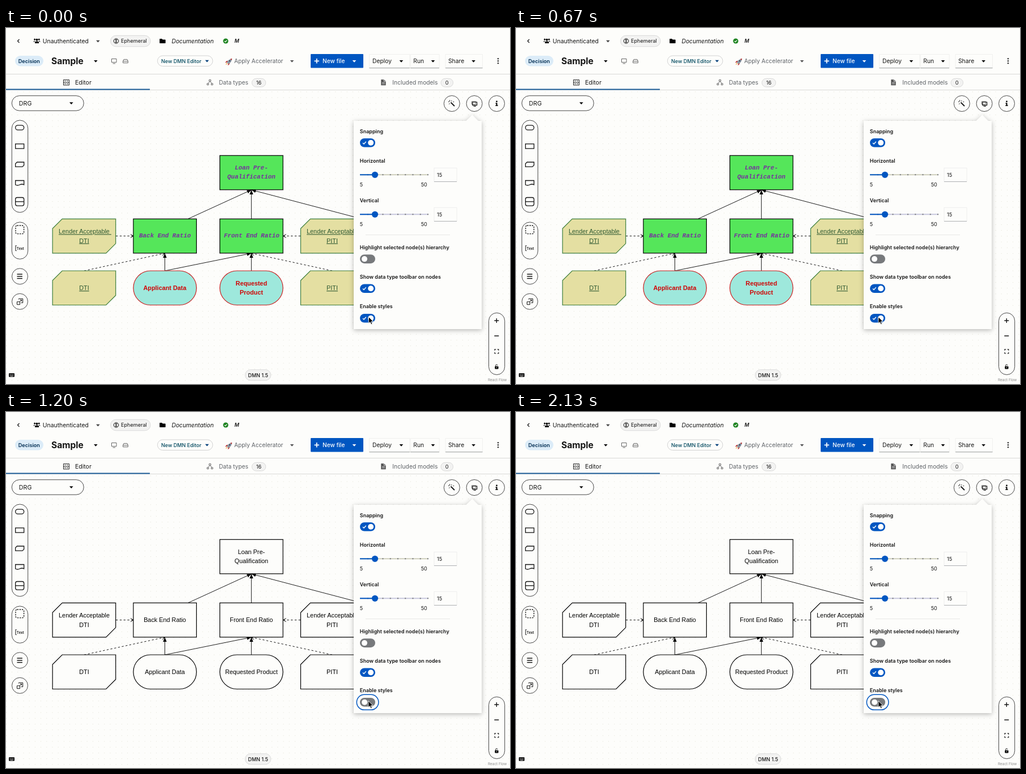
Animation of 890x629 px, one loop 2200 ms. Source, as an HTML page:

```html
<!DOCTYPE html>
<html lang="en">
<head>
<meta charset="utf-8">
<title>Diagram editor: enable styles</title>
<style>
  html, body { margin: 0; width: 100%; height: 100%; overflow: hidden; background: #fdfdfb; }
  svg { display: block; width: 890px; height: 629px; }
  text { font: 10.3px Inter, "Open Sans", sans-serif; fill: #151515; }
  .small text, text.small { font-size: 9.1px; }
  .head text { font-size: 9px; font-weight: 600; }
  .bold { font-weight: 600; }
  .medium { font-weight: 500; }
  .grey { fill: #5f6368; }
  .mid { text-anchor: middle; }
  .ln { fill: none; stroke: #151515; }
  .soft { stroke: #666; }
  .box { fill: #fdfdfb; stroke: #333; stroke-width: .9; }
  .pill { fill: #f3f3f2; stroke: #d2d2d2; stroke-width: .8; }
  .blue { fill: #0056c1; }
  .off-fill { fill: #77797c; }
  .dot { fill: #fff; }

  /* diagram */
  .solid, .dashed { fill: none; stroke: #000; stroke-width: .9; }
  .solid { marker-end: url(#full); }
  .dashed { marker-end: url(#open); stroke-dasharray: 3.4; }
  .nodes { stroke-width: 1.2; }
  .nodes text { font: 10.85px "Liberation Sans", Arial, sans-serif; text-anchor: middle; stroke: none; fill: #000; }
  .plain { fill: #fdfdfb; stroke: #000; }
  .know { fill: #e4dfa2; stroke: #3c7d3a; }
  .know text { fill: #2e5932; text-decoration: underline; }
  .dec { fill: #55e65a; stroke: #000; }
  .dec text { font: italic bold 10.9px "Liberation Mono", "Courier New", monospace; fill: #76309f; }
  .inp { fill: #9ee8dc; stroke: #c81e1e; }
  .inp text { font-weight: bold; fill: #d00505; }

  /* one loop, the click lands at 42.25% */
  .on, .off, .knob, .cursor { animation: 2200ms step-end infinite; }
  .on { animation-name: on; }
  .off { animation-name: off; }
  .knob { animation-name: knob; }
  .cursor { animation-name: cursor; }
  @keyframes on { 0% { opacity: 1 } 42.25%, 100% { opacity: 0 } }
  @keyframes off { 0% { opacity: 0 } 42.25%, 100% { opacity: 1 } }
  @keyframes knob {
    0% { transform: none }
    42.25% { transform: translateX(-3px) }
    45.43% { transform: translateX(-8.5px) }
    48.6%, 100% { transform: translateX(-11px) }
  }
  @keyframes cursor { 0% { transform: none } 27.25%, 100% { transform: translateX(-.6px) } }
</style>
</head>
<body>
<svg viewBox="0 0 890 629">
  <defs>
    <pattern id="dots" x="76.9" y="219.9" width="10.2" height="10.2" patternUnits="userSpaceOnUse">
      <circle cx="5.1" cy="5.1" r=".55" fill="#d6d6c6"/>
    </pattern>
    <marker id="full" viewBox="0 0 8 8" refX="8" refY="4" markerWidth="8" markerHeight="8" markerUnits="userSpaceOnUse" orient="auto">
      <path d="M0 .8L8 4L0 7.2z"/>
    </marker>
    <marker id="open" viewBox="0 0 8 8" refX="7" refY="4" markerWidth="8" markerHeight="8" markerUnits="userSpaceOnUse" orient="auto">
      <path d="M2 1L7 4L2 7" fill="none" stroke="#000"/>
    </marker>
    <path id="caret" d="M-3.3-1.6h6.6L0 2.1z"/>
    <path id="bkm" d="M17 0H111.5V43.5L94.5 60.5H0V17z"/>
    <rect id="rect" width="111.5" height="60.5"/>
    <rect id="oval" width="111.5" height="60.5" rx="30.2"/>
    <rect id="track" width="27" height="15.6" rx="7.8"/>
    <g id="checked">
      <use href="#track" class="blue"/>
      <path d="M5 8l2 2 3.8-4.3" fill="none" stroke="#fff" stroke-width="1.4"/>
    </g>
    <g id="slider">
      <path d="M0 0H120" stroke-width="2"/>
      <path d="M13 0H121" stroke="#77797c" stroke-width="2" stroke-dasharray="2 11.25"/>
      <path d="M0 0H26" stroke="#0056c1" stroke-width="2"/>
      <circle cx="26.5" r="5.6" class="blue" stroke="none"/>
      <rect x="131" y="-12" width="40" height="24" fill="#fdfdfb" stroke="#eee"/>
      <path d="M131 12.2h40" stroke="#b0b2b5"/>
    </g>
  </defs>

  <rect width="890" height="629" fill="#fdfdfb"/>
  <rect y="109" width="890" height="520" fill="url(#dots)"/>

  <!-- top bar -->
  <path class="ln" d="M23.5 20l-3 3 3 3" stroke-width="1.2"/>
  <g>
    <circle cx="54.5" cy="20.8" r="2"/><circle cx="50.7" cy="20.2" r="1.4"/><circle cx="58.3" cy="20.2" r="1.4"/>
    <path d="M51 27v-1.5q0-2 2-2h3q2 0 2 2V27zM48.6 24.6q0-2.2 2-2.2h.7q-1.3 1-1.3 2.2zM60.4 24.6q0-2.2-2-2.2h-.7q1.3 1 1.3 2.2z"/>
  </g>
  <text x="64.8" y="26.8" style="font-size:10.4px">Unauthenticated</text>
  <use href="#caret" x="162.4" y="23.3" fill="#444"/>
  <rect class="pill" x="184.5" y="13.3" width="70.5" height="19.5" rx="9.7"/>
  <circle class="ln" cx="194.5" cy="23" r="4.3"/>
  <path class="ln" d="M192.8 20.5h3.4l-3.4 5h3.4z" stroke-width=".9"/>
  <text class="small" x="203" y="26.4">Ephemeral</text>
  <path d="M271.2 19.8q0-.8.8-.8h3.3l1.4 1.4h4.2q.8 0 .8.8v5q0 .8-.8.8H272q-.8 0-.8-.8z"/>
  <text x="292.5" y="26.8" style="font-style:italic">Documentation</text>
  <circle cx="388" cy="23" r="4.6" fill="#1f8422"/>
  <path d="M385.8 23.1l1.6 1.6 2.8-3.1" fill="none" stroke="#fff" stroke-width="1.2"/>
  <text x="403.5" y="26.3" style="font:italic 600 9px Inter,sans-serif">M</text>

  <rect x="16" y="49" width="50" height="18.5" rx="9.2" fill="#dcecf8"/>
  <text class="small bold" x="21.8" y="61.8" style="fill:#002d52">Decision</text>
  <text x="80" y="64.2" style="font-size:15.6px;font-weight:700">Sample</text>
  <use href="#caret" x="158.4" y="58.6"/>
  <path class="ln soft" d="M186.5 54.5h8.5v6.2h-8.5zM188.5 62.8h4.6"/>
  <path class="ln soft" d="M206.6 58.5l1.4-3h6l1.4 3v3.2h-8.8zM206.6 58.7h8.8"/>
  <rect x="267.5" y="49" width="97.5" height="18.5" rx="9.2" fill="#fdfdfb" stroke="#d2d2d2"/>
  <text class="medium" x="274" y="61.8" style="font-size:9px;fill:#00485e">New DMN Editor</text>
  <use href="#caret" x="355" y="58.4" fill="#003f7a"/>
  <g>
    <path d="M390 61l-3 .4 2.3-3.2 3-.5zM392 63.3l-.2 3 3-2.6.4-3z" fill="#c23a38"/>
    <path d="M390 60.8q2.2-5.3 9.2-6.9-.7 7-6.6 9.6z" fill="#8b97a4"/>
    <path d="M396 54.8q1.6-.7 3.2-.9-.2 1.6-.8 3.2z" fill="#c23a38"/>
    <circle cx="395" cy="58.2" r="1.1" fill="#345"/>
    <path d="M390 61.4l-2.4 3.5 3.8-2z" fill="#f2a43a"/>
  </g>
  <text class="grey" x="403" y="62.3" style="font-size:10.2px">Apply Accelerator</text>
  <use href="#caret" x="505" y="58.6" fill="#555"/>
  <rect class="blue" x="538" y="46" width="93" height="24.5" rx="1"/>
  <path d="M544.5 58.3h8.4M548.7 54.1v8.4" stroke="#fff" stroke-width="1.8"/>
  <text class="medium" x="559" y="62.2" style="fill:#fff;font-size:10.1px">New file</text>
  <use href="#caret" x="615" y="58.6" fill="#fff"/>
  <path d="M641.5 46.5H713v24h-71.5zM714 46.5h51v24h-51zM776 46.5h65.5v24H776z" fill="none" stroke="#f0f0ee"/>
  <path d="M641.5 70.7H713M714 70.7h51M776 70.7h65.5" stroke="#8f9296" stroke-width=".9"/>
  <text x="647" y="62.2">Deploy</text>
  <text x="719.3" y="62.2">Run</text>
  <text x="781" y="62.2">Share</text>
  <use href="#caret" x="698" y="58.6"/><use href="#caret" x="754" y="58.6"/><use href="#caret" x="825.6" y="58.6"/>
  <g fill="#333"><circle cx="869" cy="54.3" r="1.3"/><circle cx="869" cy="58.3" r="1.3"/><circle cx="869" cy="62.3" r="1.3"/></g>

  <!-- tabs -->
  <path d="M0 81.5H890M0 109.5H890" stroke="#d9d9d7"/>
  <rect y="107.5" width="254" height="2" fill="#1f5f99"/>
  <path class="ln" d="M101.5 91.5h10V101h-10zM101.5 96.3h10M103.3 93.8h2.5M107.3 93.8h2.5M103.3 98.7h2.5M107.3 98.7h2.5" stroke-width=".9"/>
  <text x="122" y="99.9" style="font-size:10.5px">Editor</text>
  <path class="ln soft" d="M358.7 91.5h3v2.8h-3zM355 98h2.8v2.6H355zM362.4 98h2.8v2.6h-2.8zM360.2 94.3l-3.6 3.7M360.2 94.3l3.6 3.7"/>
  <text class="grey" x="376" y="99.9" style="font-size:10.2px">Data types</text>
  <rect class="pill" x="434.3" y="89.3" width="24.4" height="14.8" rx="7.4"/>
  <text class="small mid" x="446.5" y="99.8">16</text>
  <path d="M662.3 91h5.2l3.2 3.2v7h-8.4z" fill="#555"/>
  <path d="M667.3 91v3.4h3.4M664 96.5h5M664 98.7h5" fill="none" stroke="#fff" stroke-width=".7"/>
  <text class="grey" x="682.3" y="99.9">Included models</text>
  <rect class="pill" x="768" y="89.3" width="21.5" height="14.8" rx="7.4"/>
  <text class="small mid" x="778.7" y="99.8">0</text>

  <!-- diagram -->
  <path class="solid" d="M322 337L433.3 286"/>
  <path class="solid" d="M433.3 337V286"/>
  <path class="solid" d="M632 338.3L433.3 286"/>
  <path class="solid" d="M280.5 429V398"/>
  <path class="solid" d="M280.5 429L433.3 398"/>
  <path class="solid" d="M433.3 429V398"/>
  <path class="dashed" d="M194 367.5H225"/>
  <path class="dashed" d="M520 367.5H489.5"/>
  <path class="dashed" d="M138 429L280.5 398"/>
  <path class="dashed" d="M576 429L433.3 398"/>

  <g class="nodes off plain">
    <use href="#rect" x="377.6" y="225.3"/><use href="#rect" x="224.9" y="337.3"/><use href="#rect" x="377.6" y="337.3"/>
    <use href="#bkm" x="82.2" y="337.3"/><use href="#bkm" x="82.2" y="429"/>
    <use href="#bkm" x="520.4" y="337.3"/><use href="#bkm" x="520.4" y="429"/>
    <use href="#oval" x="224.9" y="429"/><use href="#oval" x="377.6" y="429"/>
    <text x="433.3" y="251.3">Loan Pre-</text><text x="433.3" y="267.3">Qualification</text>
    <text x="280.5" y="371.3">Back End Ratio</text><text x="433.3" y="371.3">Front End Ratio</text>
    <text x="138" y="363.3">Lender Acceptable</text><text x="138" y="379.5">DTI</text><text x="138" y="463.2">DTI</text>
    <text x="576" y="363.3">Lender Acceptable</text><text x="576" y="379.5">PITI</text><text x="576" y="463.2">PITI</text>
    <text x="280.5" y="463.2">Applicant Data</text><text x="433.3" y="463.2">Requested Product</text>
  </g>

  <g class="nodes on">
    <g class="dec">
      <use href="#rect" x="377.6" y="225.3"/><use href="#rect" x="224.9" y="337.3"/><use href="#rect" x="377.6" y="337.3"/>
      <text x="433.3" y="250">Loan Pre-</text><text x="433.3" y="266">Qualification</text>
      <text x="280.8" y="370">Back End Ratio</text><text x="433.8" y="370">Front End Ratio</text>
    </g>
    <g class="know">
      <use href="#bkm" x="82.2" y="337.3"/><use href="#bkm" x="82.2" y="429"/>
      <use href="#bkm" x="520.4" y="337.3"/><use href="#bkm" x="520.4" y="429"/>
      <text x="139.5" y="363.3">Lender Acceptable&nbsp;</text><text x="138" y="379.5">DTI</text><text x="138" y="463.2">DTI</text>
      <text x="577.5" y="363.3">Lender Acceptable&nbsp;</text><text x="576" y="379.5">PITI</text><text x="576" y="463.2">PITI</text>
    </g>
    <g class="inp">
      <use href="#oval" x="224.9" y="429"/><use href="#oval" x="377.6" y="429"/>
      <text x="280.5" y="463.2">Applicant Data</text>
      <text x="433.3" y="455.2">Requested</text><text x="433.3" y="471.2">Product</text>
    </g>
  </g>

  <!-- canvas controls -->
  <g class="box">
    <rect x="10.3" y="119.7" width="127" height="26.4" rx="13.2"/>
    <rect x="10.3" y="163" width="28.4" height="162.8" rx="14.2"/>
    <rect x="10.3" y="343" width="28.4" height="65.3" rx="14.2"/>
    <circle cx="24.5" cy="438.8" r="14"/><circle cx="24.5" cy="483.3" r="14"/>
    <circle cx="787.3" cy="133.5" r="14"/><circle cx="827" cy="133.5" r="14"/><circle cx="866.5" cy="133.5" r="14"/>
    <rect x="852.5" y="503.3" width="28.2" height="109.3" rx="14.1"/>
  </g>
  <text x="22.8" y="136.8" style="font-size:10.7px">DRG</text>
  <use href="#caret" x="115.3" y="132.8"/>
  <g class="ln" stroke-width="1.3">
    <rect x="16.7" y="171.8" width="15" height="8.4" rx="4.2"/>
    <rect x="16.7" y="204.8" width="15" height="8.2"/>
    <path d="M19.5 237H31.7V242.5L29 245.2H16.7V239.7z"/>
    <path d="M16.7 269.5H31.7V277q-3.5-2-7.5 0t-7.5 0z"/>
    <rect x="16.7" y="299.5" width="15" height="14.6" rx="3"/><path d="M16.7 306.8h15"/>
    <rect x="17" y="349" width="14.6" height="14.6" rx="2.5" stroke-dasharray="2.5 1.7"/>
    <path d="M18.6 384.5H17v9h1.6" stroke-width="1"/>
    <path d="M19.5 435h9.4M19.5 438.8h9.4M19.5 442.6h9.4" stroke-width="1.5"/>
    <path d="M785.5 131.5l6.5 6.5" stroke-width="1.8"/>
    <path d="M783.6 127.3v2.2M781 130.2h2M787.2 128l-1 1.6M782 134.5l1.6-1.2M789.5 130.5h1.7" stroke-width="1"/>
    <path class="soft" d="M822.5 129.8h7v5h-7z" stroke-width=".9"/>
    <rect x="823.8" y="131" width="7.8" height="5.4" stroke-width="1.2"/><path d="M825.5 138.2h4.4"/>
    <path d="M862.3 517h8M866.3 513v8M862.3 544h8" stroke-width="1.4"/>
    <path d="M863 569.8v-2h2M867.8 567.8h2v2M869.8 573v2h-2M865 575h-2v-2" stroke-width="1.2"/>
    <path d="M864.7 598v-1.7q0-1.6 1.6-1.6t1.6 1.6" stroke-width="1"/>
  </g>
  <path class="ln" d="M22.5 479.5v-1.2h7.2v7.2h-3M19.5 483.7h5v5h-5zM24 484l3.5-3.5M25 480.3h2.7v2.7"/>
  <rect x="863.3" y="597.7" width="6.2" height="4.8" rx=".8"/><circle class="dot" cx="866.4" cy="600" r=".8"/>
  <text class="bold" x="18.8" y="391.5" style="font-size:6.2px">Text</text>
  <circle cx="866.5" cy="129.8" r="1.4"/><path d="M864.5 132.3h3v4h1.2v1.5h-4.4v-1.5h1.2v-2.5h-1z"/>
  <rect x="5" y="610" width="10" height="6.5" rx="1"/>
  <path d="M6.3 612h7.5M6.3 613.5h7.5" stroke="#fff" stroke-width=".7" stroke-dasharray="1 .6"/>
  <path d="M7.5 615.2h5" stroke="#fff" stroke-width=".7"/>
  <rect class="pill" x="422.3" y="603.8" width="45.4" height="18.8" rx="9.4"/>
  <text class="mid medium" x="445.2" y="616.5" style="font-size:8.9px">DMN 1.5</text>
  <text x="851" y="624" style="font-size:6.4px;fill:#8c8c8c">React Flow</text>

  <!-- settings popover -->
  <path d="M614 164H812.5L823.3 153.5L834 164H840V532H614z" fill="#fdfdfb" style="filter:drop-shadow(0 2px 4px rgba(0,0,0,.28))"/>
  <g class="head">
    <text x="624.8" y="185.6">Snapping</text>
    <text x="624.8" y="237.7">Horizontal</text>
    <text x="624.8" y="307.6">Vertical</text>
    <text x="624.8" y="390.6">Highlight selected node(s) hierarchy</text>
    <text x="624.8" y="442.7">Show data type toolbar on nodes</text>
    <text x="624.8" y="494.7">Enable styles</text>
  </g>
  <use href="#slider" x="625" y="259.3" stroke="#cfcfbc"/>
  <use href="#slider" x="625" y="329.3" stroke="#c8c8de"/>
  <g class="small">
    <text x="624.8" y="279.7">5</text><text x="732.7" y="279.7">50</text><text x="761" y="262.7">15</text>
    <text x="624.8" y="349.7">5</text><text x="732.7" y="349.7">50</text><text x="761" y="332.7">15</text>
  </g>
  <path d="M635 365.5H784" stroke="#e8e8e6"/>
  <use href="#checked" x="625" y="195"/><circle class="dot" cx="644.2" cy="202.8" r="5"/>
  <use href="#track" x="625" y="400.3" class="off-fill"/><circle class="dot" cx="633" cy="408.1" r="5"/>
  <use href="#checked" x="625" y="452.4"/><circle class="dot" cx="644.2" cy="460.2" r="5"/>
  <use class="on" href="#checked" x="625" y="505"/>
  <g class="off">
    <rect x="619.3" y="499.3" width="38.6" height="27" rx="13.5" fill="#fdfdfb" stroke="#0056c1" stroke-width="1.5"/>
    <use href="#track" x="625" y="505" class="off-fill"/>
  </g>
  <circle class="dot knob" cx="644.2" cy="512.8" r="5"/>
  <path class="cursor" d="M640.3 510.3v11.7l2.7-2.5 1.9 4.3 2-.9-1.9-4.2h3.7z" stroke="#fff" stroke-width=".9"/>
</svg>
</body>
</html>
```
